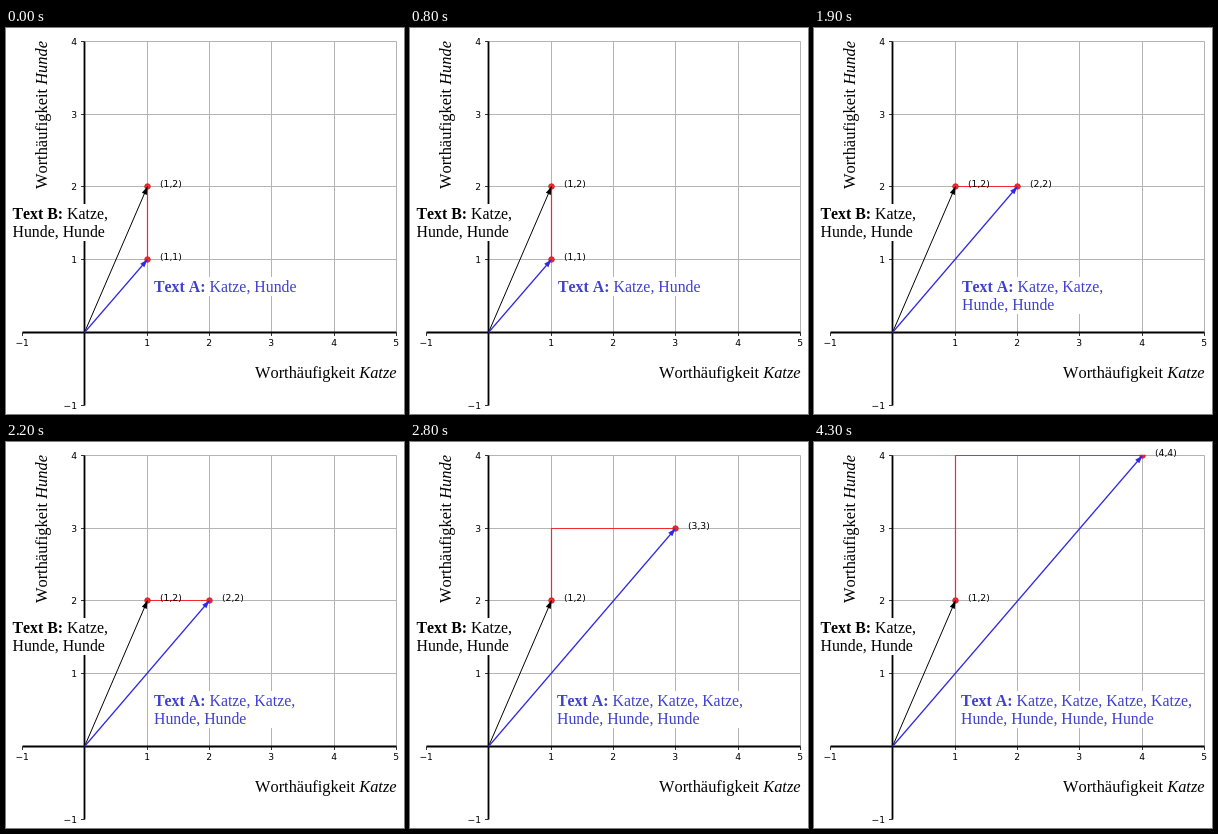
These frames come from a looping animation (398 px wide and 386 px high, 5 s). An HTML page:

```html
<!DOCTYPE html>
<html lang="de">
<head>
<meta charset="utf-8">
<title>Wortvektoren</title>
<style>
  html, body { margin: 0; width: 100%; height: 100%; overflow: hidden; background: #fff; }
  svg { display: block; width: 398px; height: 386px; font-kerning: none; }
  .serif { font: 15.85px "Liberation Serif", "Times New Roman", serif; font-kerning: none; }
  .sans { font: 9.2px "DejaVu Sans", sans-serif; }
  .title { font-size: 16.4px; }
  .bold { font-weight: bold; }
  .italic { font-style: italic; }
  .mid { text-anchor: middle; }
  .end { text-anchor: end; }
</style>
</head>
<body>
<svg id="stage" viewBox="0 0 398 386">
  <defs><clipPath id="plot"><rect x="16" y="12.8" width="375" height="365"/></clipPath></defs>
  <g id="axes"></g>
  <g id="vectors" clip-path="url(#plot)"></g>
  <g id="labels" class="sans"></g>
  <g id="notes" class="serif"></g>
  <g class="serif">
    <text class="title" x="249" y="350">Worthäufigkeit <tspan class="italic">Katze</tspan></text>
    <text class="title" transform="translate(40.8 161) rotate(-90)">Worthäufigkeit <tspan class="italic">Hunde</tspan></text>
  </g>
</svg>
<script>
const LOOP = 5000;
const BLUE = '#3029e2', RED = '#f02a2e', NOTE_BLUE = '#4040d0', GRID = '#b4b4b4';
const FIXED = [1, 2];

const STATES = [
  { start: 0, tip: [1, 1], box: [147, 249, 144, 19] },
  { start: 1200, tip: [2, 2], box: [147, 249, 144, 37] },
  { start: 2500, tip: [3, 3], box: [146, 249, 189, 37] },
  { start: 3800, tip: [4, 4], box: [146, 249, 234, 37] }
];

const $ = id => document.getElementById(id);
const snap = v => Math.floor(v) + 0.5;
const px = x => snap(78.7 + 62.33 * x);
const py = y => snap(304.4 - 72.8 * y);
const repeat = (word, n) => Array(n).fill(word).join(', ');

const line = (x1, y1, x2, y2, color, width) =>
  `<path d="M${x1} ${y1}L${x2} ${y2}" stroke="${color}" stroke-width="${width}"/>`;
const text = (x, y, content, cls = '', fill = '#000') =>
  `<text x="${x}" y="${y}" class="${cls}" fill="${fill}">${content}</text>`;
const box = ([x, y, w, h]) => `<rect x="${x}" y="${y}" width="${w}" height="${h}" fill="#fff"/>`;
const dot = ([x, y]) =>
  `<circle cx="${px(x)}" cy="${py(y)}" r="2.8" fill="${RED}" stroke="#d0181c" stroke-width="0.8"/>`;
const pointLabel = ([x, y]) => text(px(x) + 12.5, py(y) + 0.2, `(${x},${y})`);

function arrow([x, y], color, width) {
  const tx = px(x), ty = py(y);
  const angle = Math.atan2(ty - py(0), tx - px(0)) * 180 / Math.PI;
  return line(px(0), py(0), tx, ty, color, width) +
    `<path d="M0 0L-8 -2.7V2.7Z" fill="${color}" transform="translate(${tx} ${ty}) rotate(${angle})"/>`;
}

function drawAxes() {
  let grid = '', ticks = '';
  for (let i = -1; i <= 5; i++) {
    if (i === 0) continue;
    const name = i < 0 ? '\u22121' : i;
    const x = px(i), y = py(i);
    if (i > 0) grid += line(x, py(4), x, py(0), GRID, 1);
    ticks += line(x, py(0), x, py(0) + 3.5, '#000', 0.8) + text(x - 0.3, 317.7, name, 'sans mid');
    if (i === 5) continue;
    if (i > 0) grid += line(px(0), y, px(5), y, GRID, 1);
    ticks += line(px(0) - 3.5, y, px(0), y, '#000', 0.8) + text(71, y + 3.4, name, 'sans end');
  }
  $('axes').innerHTML = grid + ticks +
    line(px(-1), py(0), px(5), py(0), '#000', 1.8) +
    line(px(0), py(-1), px(0), py(4), '#000', 1.8);
}

function drawState({ tip, box: area }) {
  const [n] = tip;
  const path = `M${px(1)} ${py(2)}V${py(n)}H${px(n)}`;
  $('vectors').innerHTML =
    `<path d="${path}" fill="none" stroke="${RED}" stroke-width="1.2"/>` +
    dot(FIXED) + dot(tip) + arrow(FIXED, '#000', 1) + arrow(tip, BLUE, 1.2);
  $('labels').innerHTML = pointLabel(FIXED) + pointLabel(tip);

  const bold = s => `<tspan class="bold">${s}</tspan>`;
  const cats = repeat('Katze', n), dogs = repeat('Hunde', n);
  const left = area[0] + 1;
  const noteA = n === 1
    ? text(left, 263.5, `${bold('Text A:')} ${cats}, ${dogs}`, '', NOTE_BLUE)
    : text(left, 263.5, `${bold('Text A:')} ${cats},`, '', NOTE_BLUE) +
      text(left, 281.7, dogs, '', NOTE_BLUE);
  $('notes').innerHTML = box(area) + noteA + box([5, 176, 100, 37]) +
    text(6.5, 190.5, `${bold('Text B:')} Katze,`) + text(6.5, 208.8, 'Hunde, Hunde');
}

let shown;
function render(time) {
  const t = time % LOOP;
  const state = STATES.findLast(s => s.start <= t);
  if (state !== shown) drawState(shown = state);
}

drawAxes();
render(0);
const origin = performance.now();
requestAnimationFrame(function tick() {
  render(performance.now() - origin);
  requestAnimationFrame(tick);
});
</script>
</body>
</html>
```
